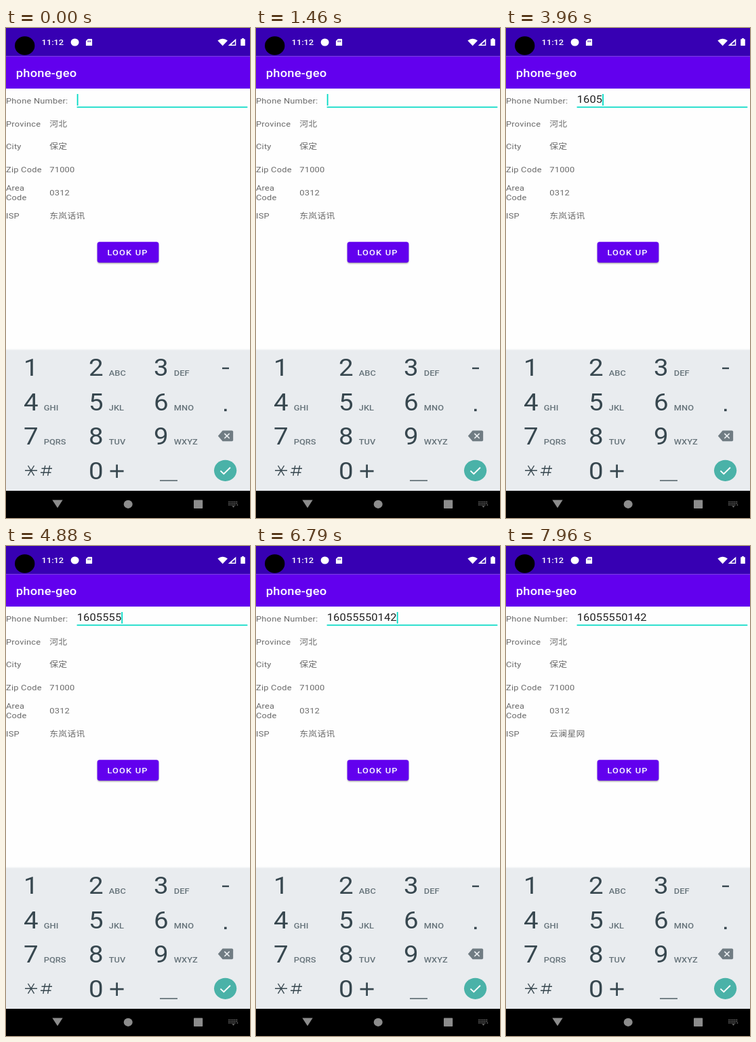
Recreate the animation shown at these times as an HTML page. Size 360 by 720 pixels, loop 8 s.

```html
<!DOCTYPE html>
<html lang="en">
<head>
<meta charset="utf-8">
<title>phone-geo</title>
<style>
  html, body { margin: 0; width: 100%; height: 100%; overflow: hidden; background: #fefefe; }
  svg { display: block; width: 360px; height: 720px; }
  text { font-family: Roboto, "Noto Sans CJK SC", "Noto Sans CJK", sans-serif; white-space: pre; }
</style>
</head>
<body>
<svg id="stage" viewBox="0 0 360 720" xmlns="http://www.w3.org/2000/svg">
  <defs>
    <filter id="soft" x="-20%" y="-40%" width="140%" height="190%"><feGaussianBlur stdDeviation="1.3"/></filter>
    <linearGradient id="edge" x1="0" y1="0" x2="0" y2="1">
      <stop offset="0" stop-color="#fefefe"/><stop offset="1" stop-color="#e9ecef"/>
    </linearGradient>
  </defs>
  <rect width="360" height="720" fill="#fefefe"/>

  <!-- bars -->
  <rect width="360" height="41.5" fill="#3700b3"/>
  <rect y="41.5" width="360" height="47.5" fill="#6200ee"/>
  <ellipse cx="27.7" cy="26" rx="14.7" ry="13.8" fill="#000"/>
  <g fill="#fff">
    <ellipse cx="101.6" cy="21" rx="6" ry="5.6"/>
    <path fill-rule="evenodd" d="M121 16h5.2q.9 0 .9.9v8.3q0 .9-.9.9h-7.4q-.9 0-.9-.9v-6.1zM120.4 18.6v2.2h1v-2.2zM122.3 18.6v2.2h1v-2.2zM124.2 18.6v2.2h1v-2.2z"/>
    <path d="M312.3 18.6Q319.6 13 327 18.6L319.6 26.3z"/>
    <path fill-rule="evenodd" d="M339.3 15.8V26H328zM337.8 19.4l-5.6 5.2h5.6z"/>
    <path d="M333 21.5V26h-5z"/>
    <path d="M348.2 15h2.6v1.2h1.3q.7 0 .7.7v8.5q0 .7-.7.7h-5.2q-.7 0-.7-.7v-8.5q0-.7.7-.7h1.3z"/>
  </g>

  <!-- field and button -->
  <rect x="104.6" y="115.5" width="251.7" height="1.7" fill="#03dac5"/>
  <rect x="135" y="316" width="90" height="30" rx="3.5" fill="#000" opacity=".38" filter="url(#soft)"/>
  <rect x="134.6" y="314.2" width="90.8" height="30.6" rx="3.5" fill="#6200ee"/>

  <!-- keypad -->
  <rect y="472" width="360" height="208" fill="#e9ecef"/>
  <rect y="471" width="360" height="3" fill="url(#edge)"/>
  <g fill="none" stroke="#37474f">
    <path stroke-width="1.4" d="M28 650.3h18M32.5 643l9 14.6M41.5 643l-9 14.6"/>
    <path stroke-width="1.4" d="M52.5 647.3h15.5M51 653.3h15.5M57.8 642.8l-3 15M64.6 642.8l-3 15"/>
    <path stroke-width="2.7" d="M153.6 651.2h20M163.6 641.4v19.6"/>
    <path stroke-width="1.3" d="M227 665h26"/>
    <path stroke-width="2.4" d="M319 500h10"/>
    <path stroke-width="3.4" d="M322 561.4h3.6"/>
  </g>
  <path fill="#707c83" d="M319.6 591.6h13.7q1.8 0 1.8 1.7v12.3q0 1.7-1.8 1.7h-13.7l-6.8-7.85z"/>
  <path fill="none" stroke="#e9ecef" stroke-width="1.7" d="M322.3 595.8l7.4 7.2M329.7 595.8l-7.4 7.2"/>
  <ellipse cx="323.6" cy="650.3" rx="16.6" ry="15.6" fill="#4ab2a8"/>
  <path fill="none" stroke="#fff" stroke-width="1.9" d="M316.4 650.6l4.9 4.6 9.6-9.4"/>

  <!-- navigation -->
  <rect y="680" width="360" height="40" fill="#000"/>
  <g fill="#8c8c8c">
    <path d="M68.3 693.4h15.4l-7.7 11.8z"/>
    <ellipse cx="180.2" cy="699.8" rx="6.5" ry="6.1"/>
    <rect x="277" y="693.6" width="13.2" height="12.4" rx=".8"/>
  </g>
  <g stroke="#858585" fill="none" stroke-width="1.3">
    <path stroke-dasharray="1.6 1.2" d="M328.4 696.3h14M328.4 698.6h14M328.4 700.9h2.2M331.2 700.9h8M340.6 700.9h1.8"/>
  </g>
  <path fill="#858585" d="M333.4 702.5h4.2l-2.1 1.9z"/>
</svg>
<script>
  const LOOP = 8000, SX = 360 / 392.7, SY = 720 / 850.9;
  const NUMBER = "16055550142";
  const KEY_TIMES = [2200, 2650, 3200, 3600, 4000, 4400, 4800, 5400, 5830, 6130, 6420];
  const RESULT_AT = 7600;
  const stage = document.getElementById("stage");

  function add(tag, attrs) {
    const el = document.createElementNS("http://www.w3.org/2000/svg", tag);
    for (const k in attrs) el.setAttribute(k, attrs[k]);
    return stage.appendChild(el);
  }

  // The whole screen shares one scale from dp to pixels.
  function label(str, x, y, size, fill, weight = 400, spacing = 0) {
    const el = add("text", {
      transform: `translate(${x} ${y}) scale(${SX} ${SY})`,
      "font-size": size, "font-weight": weight, fill, "letter-spacing": spacing
    });
    el.textContent = str;
    return el;
  }

  label("11:12", 52.6, 25.4, 14, "#fff", 500);
  label("phone-geo", 14.7, 72.2, 20, "#fff", 500, 0.25);
  label("LOOK UP", 149.4, 334.1, 14, "#fff", 500, 1.25);

  const row = i => 110.7 + i * 33.85;
  const body = (str, x, y) => label(str, x, y, 14, "#6a6a6a", 400, 0.25);
  body("Phone Number:", 0, row(0));
  [["Province", "河北"], ["City", "保定"], ["Zip Code", "71000"], ["", "0312"], ["ISP", ""]]
    .forEach(([name, value], i) => {
      body(name, 0, row(i + 1));
      body(value, 64.3, row(i + 1));
    });
  body("Area", 0, row(4) - 7);
  body("Code", 0, row(4) + 7);
  const isp = body("", 64.3, row(5));

  ["1", "2 ABC", "3 DEF", "4 GHI", "5 JKL", "6 MNO", "7 PQRS", "8 TUV", "9 WXYZ", "", "0"]
    .forEach((key, i) => {
      const [digit, letters = ""] = key.split(" ");
      const x = 26 + (i % 3) * 96, y = 511 + Math.floor(i / 3) * 50.7;
      label(digit, x, y, 42, "#37474f");
      label(letters, x + 29.8, y, 14, "#66737a", 500);
    });

  const typed = label("", 104.7, 110, 18, "#212121", 400, 0.11);
  const cursor = add("rect", { y: 97, width: 1.8, height: 17, fill: "#03dac5" });

  function cursorOn(t, count) {
    if (!count) return (t + 440) % 940 < 480;
    return (t - KEY_TIMES[count - 1]) % 1000 < 540;
  }

  function draw(t) {
    const count = KEY_TIMES.filter(k => k <= t).length;
    typed.textContent = NUMBER.slice(0, count);
    cursor.setAttribute("x", 104.7 + count * 9.37);
    cursor.setAttribute("visibility", cursorOn(t, count) ? "visible" : "hidden");
    isp.textContent = t < RESULT_AT ? "东岚话讯" : "云澜星网";
  }

  const start = performance.now();
  function tick() {
    draw((performance.now() - start) % LOOP);
    requestAnimationFrame(tick);
  }
  draw(0);
  requestAnimationFrame(tick);
</script>
</body>
</html>
```
